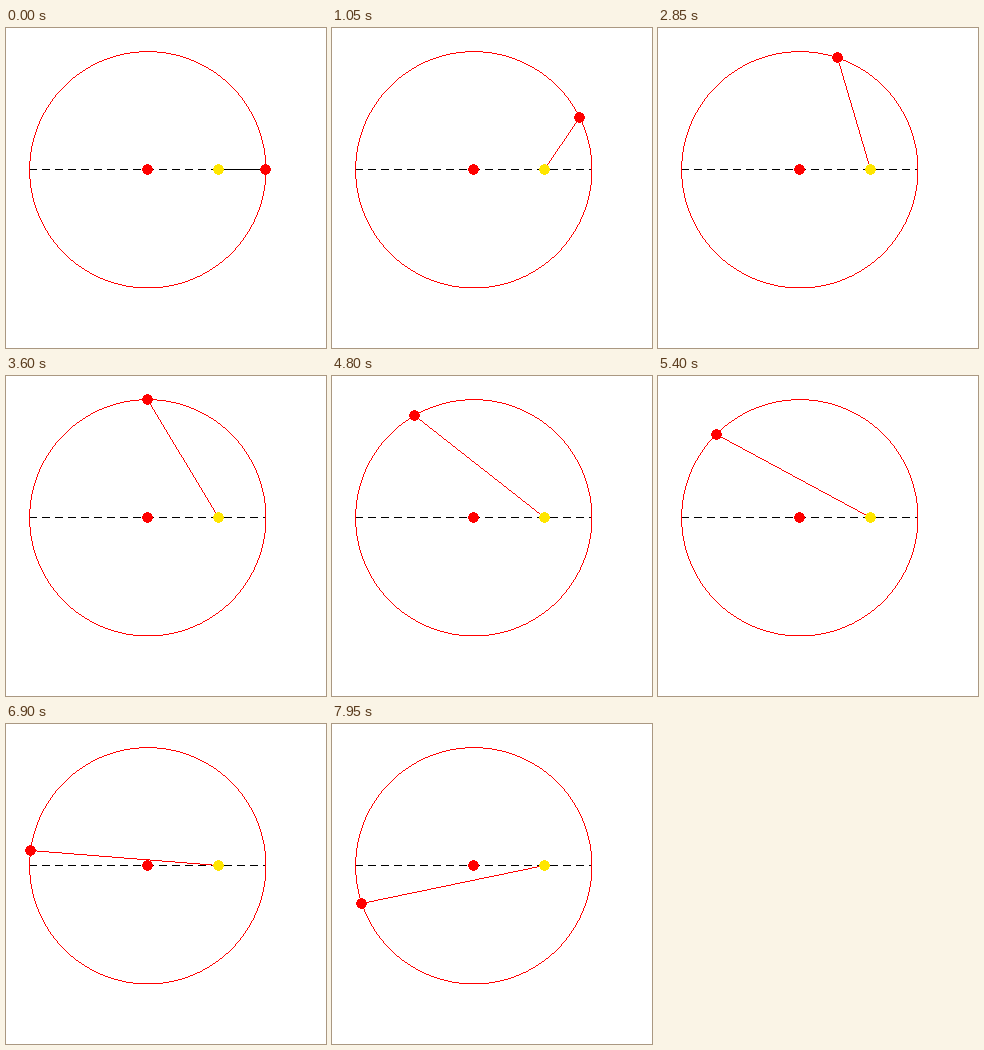
An HTML page with a canvas for the animation above (8000 ms loop, 320 px wide and 320 px high).

```html
<!DOCTYPE html>
<html lang="en">
<head>
<meta charset="utf-8">
<title>Point on a circle</title>
<style>
  html, body { margin: 0; width: 100%; height: 100%; overflow: hidden; background: #fff; }
  canvas { display: block; image-rendering: pixelated; }
</style>
</head>
<body>
<canvas id="stage" width="320" height="320"></canvas>
<script>
const ctx = document.getElementById('stage').getContext('2d');
const C = 141, R = 118, FOCUS = 212;
const RED = '#f00', YELLOW = '#ffe600', BLACK = '#000';
const LOOP = 8000, STEP = 150, TURN = 3.75 * Math.PI / 180;
const DASH = 8, PERIOD = 13;

const dot = (x, y) => ctx.fillRect(Math.round(x), Math.round(y), 1, 1);

// Crisp one-pixel line without antialiasing
function line(x0, y0, x1, y1, color) {
  ctx.fillStyle = color;
  const n = Math.max(Math.abs(x1 - x0), Math.abs(y1 - y0));
  for (let i = 0; i <= n; i++) dot(x0 + (x1 - x0) * i / n, y0 + (y1 - y0) * i / n);
}

function circle(c, r) {
  ctx.fillStyle = RED;
  const half = r * Math.SQRT1_2;
  for (let p = Math.round(c - half); p <= Math.round(c + half); p++) {
    const d = Math.sqrt(r * r - (p - c) ** 2);
    for (const q of [c - d, c + d]) {
      dot(p, q);
      dot(q, p);
    }
  }
}

function disc(x, y, color) {
  ctx.fillStyle = color;
  for (let dy = -5; dy <= 5; dy++) {
    const w = Math.floor(Math.sqrt(27 - dy * dy));
    ctx.fillRect(x - w, y + dy, 2 * w + 1, 1);
  }
}

function diameter() {
  const end = C + R;
  for (let x = C - R; x <= end; x += PERIOD) {
    line(x, C, Math.min(x + DASH - 1, end), C, BLACK);
  }
}

function draw(t) {
  const step = Math.floor(t % LOOP / STEP);
  const x = Math.round(C + R * Math.cos(step * TURN));
  const y = Math.round(C - R * Math.sin(step * TURN));

  ctx.fillStyle = '#fff';
  ctx.fillRect(0, 0, 320, 320);
  diameter();
  circle(C + 0.3, R + 0.15);
  line(FOCUS, C, x, y, step ? RED : BLACK);
  disc(C, C, RED);
  disc(FOCUS, C, YELLOW);
  disc(x, y, RED);
}

const start = performance.now();
function tick() {
  draw(performance.now() - start);
  requestAnimationFrame(tick);
}
tick();
</script>
</body>
</html>
```
